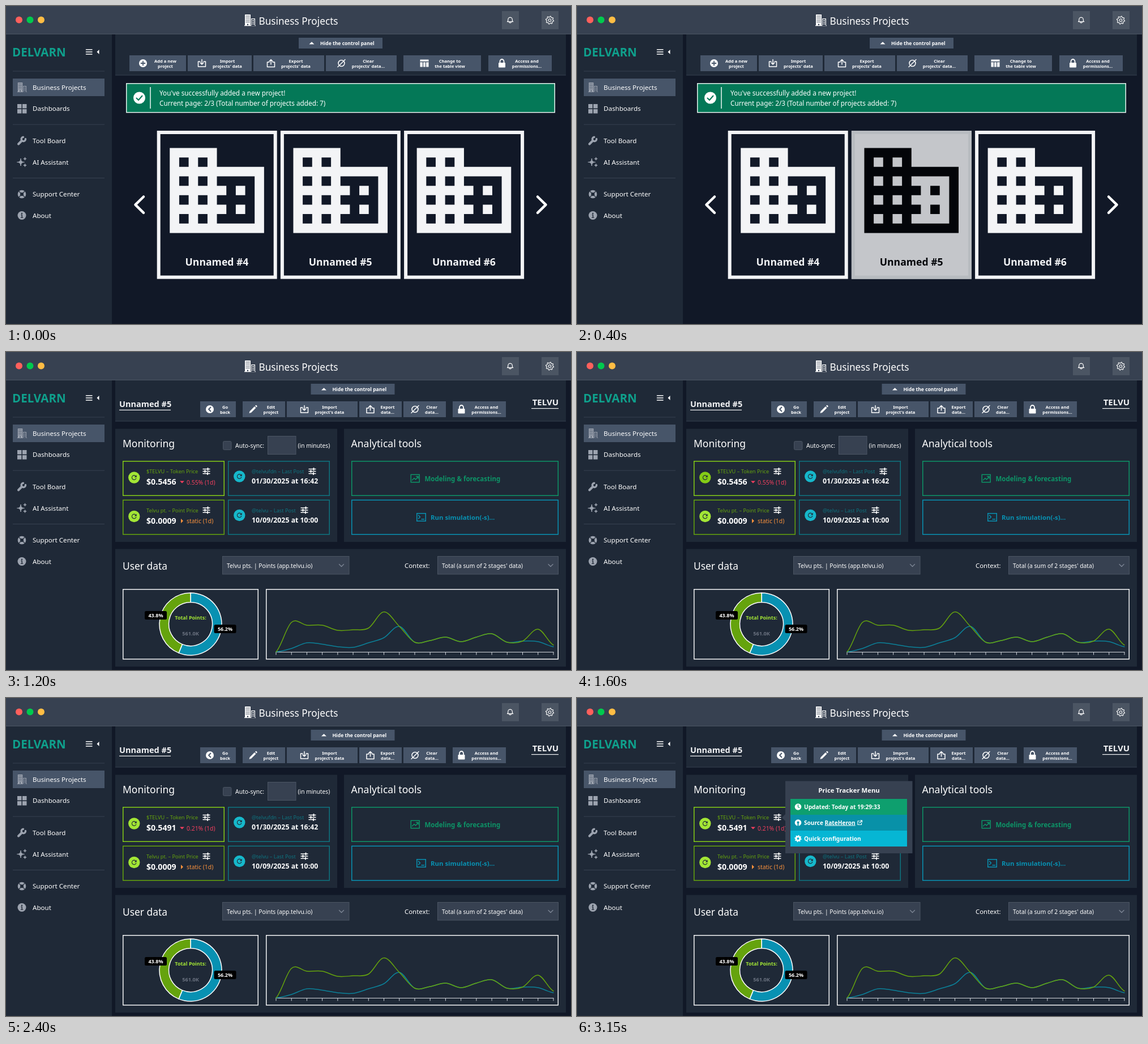
Animation of 998x561 px, one loop 3900 ms. Source, as an HTML page:

```html
<!DOCTYPE html>
<html lang="en">
<head>
<meta charset="utf-8">
<title>Business Projects</title>
<style>
html, body { margin: 0; width: 100%; height: 100%; overflow: hidden; background: #111827; }
svg { display: block; width: 100vw; height: 100vh; }
text { font-family: "Noto Sans", "Open Sans", sans-serif; white-space: pre; }
.line { fill: none; stroke: #fff; stroke-width: 1.5; }
.round { stroke-linecap: round; stroke-linejoin: round; }

/* Every state switches hard on one 3.9 s timeline. */
.list, .hover, .detail, .old, .new, .menu, .tracker, .refresh {
  animation: 3900ms step-end infinite;
}
.list { animation-name: list; }
.hover { animation-name: hover; }
.detail { animation-name: detail; }
.old { animation-name: old; }
.new { animation-name: new; }
.menu { animation-name: menu; }
.tracker { animation-name: tracker; }
.refresh { animation-name: refresh; }
@keyframes list { 0% { opacity: 1 } 20.5128%, 100% { opacity: 0 } }
@keyframes hover { 0% { opacity: 0 } 10.2564% { opacity: 1 } 20.5128%, 100% { opacity: 0 } }
@keyframes detail { 0% { opacity: 0 } 20.5128%, 100% { opacity: 1 } }
@keyframes old { 0% { opacity: 1 } 51.282%, 100% { opacity: 0 } }
@keyframes new { 0% { opacity: 0 } 51.282%, 100% { opacity: 1 } }
@keyframes menu { 0% { opacity: 0 } 80.7692%, 100% { opacity: 1 } }
@keyframes tracker { 0% { stroke: #65a30d } 30.7692%, 100% { stroke: #84cc16 } }
@keyframes refresh { 0% { fill: #a3e635 } 41.0256% { fill: #84cc16 } 61.5384%, 100% { fill: #a3e635 } }
</style>
</head>
<body>
<svg id="stage" viewBox="0 0 998 561" preserveAspectRatio="none">
  <defs>
    <path id="office" fill-rule="evenodd" d="M12 7V3H2v18h20V7zM4 5h2v2H4zm0 4h2v2H4zm0 4h2v2H4zm0 4h2v2H4zM8 5h2v2H8zm0 4h2v2H8zm0 4h2v2H8zm0 4h2v2H8zM12 9h8v10h-8v-2h2v-2h-2v-2h2v-2h-2zm4 2h2v2h-2zm0 4h2v2h-2z"/>
    <path id="reload" transform="scale(.55) translate(-12 -12)" d="M17.65 6.35A8 8 0 1 0 19.73 14h-2.08A6 6 0 1 1 12 6c1.66 0 3.14.69 4.22 1.78L13 11h7V4z"/>
    <g id="sliders" class="line round">
      <path d="M0 1.5h12M0 5.5h12M0 9.5h12" stroke-width="1.3"/>
      <path d="M8.5 0v3M3.5 4v3M8 8v3" stroke-width="2"/>
    </g>
    <g id="towers" fill-rule="evenodd">
      <path d="M1 0h10v20H1zM2.7 2v1.6h1.6V2zM5.2 2v1.6h1.6V2zM7.7 2v1.6h1.6V2zM2.7 5.5v1.6h1.6V5.500zM5.200 5.500v1.600h1.600V5.500zM7.700 5.500v1.600h1.600V5.500zM2.700 9v1.600h1.600V9zM5.200 9v1.600h1.600V9zM7.700 9v1.600h1.600V9zM2.700 12.500v1.600h1.600v-1.600zM5.200 12.500v1.600h1.600v-1.600zM7.700 12.500v1.600h1.600v-1.600zM5 16.500V20h2v-3.500z"/>
      <path d="M12 7h7v13h-7zM13 8.200V19h4.800V8.200zM14 10h3v1.200h-3zM14 13h3v1.200h-3zM14 16h3v1.200h-3zM0 19h20v1.300H0z"/>
    </g>
  </defs>
</svg>
<script>
const slate = '#475569', panel = '#1f2937', gray = '#374151', pale = '#f3f4f6', muted = '#9ca3af';

const rect = (x, y, r, b, fill, extra = '') =>
  `<rect x="${x}" y="${y}" width="${r - x}" height="${b - y}" fill="${fill}" ${extra}/>`;
const frame = (x, y, r, b, fill, color, w = 1.5, extra = '') =>
  rect(x + w / 2, y + w / 2, r - w / 2, b - w / 2, fill, `stroke="${color}" stroke-width="${w}" ${extra}`);
const text = (x, y, size, str, fill = '#fff', weight = 400, anchor = 'start') =>
  `<text x="${x}" y="${y}" font-size="${size}" fill="${fill}" font-weight="${weight}" text-anchor="${anchor}">${str}</text>`;
const circle = (x, y, r, fill, extra = '') => `<circle cx="${x}" cy="${y}" r="${r}" fill="${fill}" ${extra}/>`;
const path = (d, fill, extra = '') => `<path d="${d}" fill="${fill}" ${extra}/>`;
const line = (d, color = '#fff', w = 1.5) =>
  `<path d="${d}" class="line round" style="stroke:${color};stroke-width:${w}"/>`;
const at = (x, y, body, scale = 1) => `<g transform="translate(${x} ${y}) scale(${scale})">${body}</g>`;
const group = (name, body) => `<g class="${name}">${body}</g>`;
const use = (id, fill = '#fff') => `<use href="#${id}" fill="${fill}"/>`;

function gear(r) {
  const points = Array.from({ length: 32 }, (_, i) => {
    const a = (i + .5) * Math.PI / 16, d = i % 4 < 2 ? r : r * .76;
    return `${(d * Math.cos(a)).toFixed(2)} ${(d * Math.sin(a)).toFixed(2)}`;
  });
  return `M${points.join('L')}Z`;
}

const icons = {
  plus: circle(0, 0, 7, '#fff') + line('M-3.500 0h7M0-3.500v7', slate, 1.8),
  import: line('M-3-3h-3.500v9h13v-9H3M0-6.500v8.500M-3-1l3 3 3-3'),
  export: line('M-3-2h-3.500v8.500h13V-2H3M0 2v-8.500M-3-3.500l3-3 3 3'),
  clear: circle(0, 0, 5.5, 'none', 'class="line"') + line('M-6.500 6.500l13-13'),
  table: rect(-7.5, -6.5, 7.5, 6.5, '#fff') + line('M-7-2.500H7M-2.500-2v8.500M2.500-2v8.500', slate, 1.3),
  lock: rect(-6, -1, 6, 7.5, '#fff', 'rx="1"') + line('M-3.500-1v-2.500a3.500 3.500 0 0 1 7 0V-1', '#fff', 1.8),
  back: circle(0, 0, 7, '#fff') + line('M1.500-3.500L-2 0l3.500 3.500', slate, 1.8),
  edit: path('M-7 7l1-3.500L2.500-5 5-2.500-3.500 6zM3.500-6l1-1q1-.500 2 .500t.500 2l-1 1z', '#fff')
};

function button(x, r, icon, iconX, textX, first, second) {
  return rect(x, 87, r, 115, slate) + at(iconX, 101, icons[icon]) +
    text(textX, 100, 7.6, first, '#fff', 600, 'middle') +
    text(textX, 108.6, 7.6, second, '#fff', 600, 'middle');
}

function controlBar(x) {
  return rect(193, 50, 989, 122, panel) + rect(193, 121.5, 989, 122.5, gray) +
    rect(x, 56, x + 148, 75, slate) +
    path(`M${x + 18.500} 67.500h9l-4.500-4.200z`, '#fff') +
    text(x + 38, 69, 8.6, 'Hide the control panel', '#fff', 600);
}

function sidebar() {
  const labels = [['Business Projects', 148], ['Dashboards', 185], ['Tool Board', 242],
    ['AI Assistant', 279.5], ['Support Center', 336], ['About', 374]];
  const star = (x, y, r) =>
    path(`M${x} ${y - r}Q${x} ${y} ${x + r} ${y}Q${x} ${y} ${x} ${y + r}Q${x} ${y} ${x - r} ${y}Q${x} ${y} ${x} ${y - r}`,
      muted, `stroke="${muted}"`);
  const tiles = [[20, 173], [29, 173], [20, 182], [29, 182]];
  return rect(0, 50, 187, 561, panel) +
    text(11, 89, 20.5, 'DELVARN', '#0fa08c', 700) +
    line('M141.500 77h10.500M141.500 81h10.500M141.500 85h10.500', '#fff', 1.5) + path('M164.500 77v8l-4-4z', '#fff') +
    [115, 209, 303.5].map(y => rect(12, y - .5, 174, y + .5, gray)).join('') +
    rect(12, 128, 174, 159, slate) + at(20, 135, use('towers', muted), .84) +
    tiles.map(([x, y]) => rect(x, y, x + 7.5, y + 7.5, muted)).join('') +
    line('M22 243.500l6-6', muted, 4) + line('M34.500 234.500a3.700 3.700 0 1 1-4-3.300', muted, 3.4) +
    star(26, 275.5, 6.5) + star(33.5, 269.5, 2.6) + star(33.5, 281, 2.6) +
    circle(28, 332, 5.2, 'none', `stroke="${muted}" stroke-width="4.200"`) +
    line('M23 327l2.500 2.500M33 327l-2.500 2.500M23 337l2.500-2.500M33 337l-2.500-2.500', panel, 1.2) +
    circle(28, 369.5, 7.5, muted) + circle(28, 366, 1.2, panel) + line('M27 368.500h1.200v4.500M26.500 373.200h3.200', panel, 1.3) +
    labels.map(([s, y]) => text(47, y, 11.6, s)).join('');
}

function header() {
  return rect(0, 0, 998, 50, gray) + rect(0, 49, 998, 50, '#4b5563') +
    circle(23, 24.5, 6, '#ff605c') + circle(42.5, 24.5, 6, '#00ca4e') + circle(62, 24.5, 6, '#ffbd44') +
    at(421, 15, use('towers')) + text(446.5, 33, 17.2, 'Business Projects') +
    rect(876, 9, 906, 41, '#4b5563') + rect(946, 9, 976, 41, '#4b5563') +
    at(883, 17, line('M4 17h16l-2-2.500V11a6 6 0 0 0-12 0v3.500zM9 17.500a3 3 0 0 0 6 0', '#fff', 1.9), .63) +
    at(960.5, 25, line(gear(7), '#fff', 1.1) + circle(0, 0, 2.3, 'none', 'stroke="#fff" stroke-width="1.100"'));
}

function projectCard(x, number, fill, border, ink) {
  return frame(x, 220, x + 212, 481.5, fill, border, 6) + at(x + 5.9, 225.5, use('office', ink), 8.33) +
    text(x + 105.8, 458, 17.6, `Unnamed #${number}`, ink, 700, 'middle');
}

function projectList() {
  const cards = [4, 5, 6].map((n, i) => projectCard(266.7 + i * 218.2, n, '#111827', pale, pale)).join('');
  return controlBar(517) +
    button(218, 318, 'plus', 242, 281.5, 'Add a new', 'project') +
    button(321, 434, 'import', 346, 391, 'Import', "projects' data") +
    button(437, 562, 'export', 468, 512, 'Export', "projects' data") +
    button(565, 690, 'clear', 592.5, 640, 'Clear', "projects' data...") +
    button(702, 839, 'table', 739, 784, 'Change to', 'the table view') +
    button(852, 964, 'lock', 876, 920, 'Access and', 'permissions...') +
    frame(212, 136, 970, 188.5, '#047857', '#e5f3ee') +
    circle(235.5, 162, 10.5, '#fff') + line('M230.500 162.500l3.500 3.500 6.500-7.500', '#047857', 2) +
    rect(254.3, 143, 255.7, 181, '#fff') +
    text(271, 157.5, 11.75, "You've successfully added a new project!") +
    text(271, 176, 11.75, 'Current page: 2/3 (Total number of projects added: 7)') +
    line('M243 336.500l-14.500 14.200 14.500 14.200', '#fff', 4.5) + line('M939 336.500l14.500 14.200-14.500 14.200', '#fff', 4.5) +
    cards + group('hover', projectCard(484.9, 5, '#c4c6ca', '#b8bcc0', '#030509'));
}

function feed(x, y, label, slidersX, color, iconColor, iconY, classes = ['', '']) {
  const border = `class="${classes[0]}"`, disc = `class="${classes[1]}"`;
  return frame(x, y, x + 180, y + 62, panel, color, 1.5, border) +
    circle(x + 20.3, iconY, 10.2, iconColor, disc) + at(x + 20.3, iconY, use('reload', panel)) +
    text(x + 42, y + 22, 9.2, label, color) + at(slidersX, y + 13, use('sliders'));
}

const price = (value, change) =>
  text(248, 234, 14.2, value, '#fff', 700) + text(319, 233.5, 10.4, change, '#f43f5e');

function monitoring() {
  const lime = '#65a30d', teal = '#0e7480', cyan = '#16b8cb';
  return rect(193, 135.5, 585, 335, panel) + text(206, 168, 17.5, 'Monitoring') +
    frame(383, 157, 398.5, 173, gray, '#4b5563', 1, 'rx="2"') + text(405, 169, 10.4, 'Auto-sync:') +
    frame(462, 148, 512.5, 181, gray, '#4b5563', 1) + text(515.5, 168.5, 10.2, '(in minutes)') +
    feed(206, 192, '$TELVU – Token Price', 348, lime, '#a3e635', 221.5, ['tracker', 'refresh']) +
    feed(206, 260.5, 'Telvu pt. – Point Price', 348, lime, '#a3e635', 290) +
    feed(392, 192, '@telvufdn – Last Post', 535, teal, cyan, 219.5) +
    feed(392, 260.5, '@telvu – Last Post', 521, teal, cyan, 288) +
    group('old', price('$0.5456', '0.55% (1d)')) + group('new', price('$0.5491', '0.21% (1d)')) +
    path('M307 227.500h8l-4 4z', '#f43f5e') +
    text(248, 303, 14.2, '$0.0009', '#fff', 700) + path('M309 294v8l4-4z', '#fb923c') +
    text(319, 302, 10.4, 'static (1d)', '#fb923c') +
    text(434, 232, 12.3, '01/30/2025 at 16:42', '#fff', 700) +
    text(434, 301, 12.3, '10/09/2025 at 10:00', '#fff', 700);
}

function tools() {
  const green = '#0d9467', blue = '#0891b2';
  return rect(597, 135.5, 989, 335, panel) + text(609.5, 168, 17.6, 'Analytical tools') +
    frame(610, 192, 976, 254, panel, green) + frame(610, 260.5, 976, 322.5, panel, blue) +
    frame(714.5, 215.5, 731, 230.5, 'none', green) + line('M717.500 226l3.500-3.500 2.500 2.500 4.500-5M724.500 219.500h3.700v3.500', green, 1.5) +
    text(739.5, 227.5, 11.5, 'Modeling &amp; forecasting', green, 600) +
    frame(725, 284, 742, 299, 'none', blue) + line('M728.500 288l3 3-3 3M734 295h4.500', blue, 1.5) +
    text(750, 296, 11.4, 'Run simulation(-s)...', blue, 600);
}

const select = (x, r, label) => frame(x, 360, r, 392.5, gray, '#4b5563', 1) +
  text(x + 8, 380.5, 10.25, label) + line(`M${r - 18} 374.500l4 4 4-4`, '#7b8493', 1.4);

const tag = (x, y, label) => rect(x, y, x + 39, y + 15, '#000', 'rx="2.500"') +
  text(x + 19.5, y + 10.8, 9, label, '#fff', 700, 'middle');

function donut() {
  const x = 326, y = 480, outer = 55, inner = 38.5;
  const point = (r, part) => {
    const a = part * 2 * Math.PI;
    return `${x + r * Math.sin(a)} ${y - r * Math.cos(a)}`;
  };
  const slice = (from, to, color) => {
    const large = to - from > .5 ? 1 : 0;
    return path(`M${point(outer, from)}A${outer} ${outer} 0 ${large} 1 ${point(outer, to)}L${point(inner, to)}` +
      `A${inner} ${inner} 0 ${large} 0 ${point(inner, from)}Z`, color, 'stroke="#fff" stroke-width="1.500"');
  };
  return slice(0, .562, '#0891b2') + slice(.562, 1, '#65a30d') +
    text(x, 472, 9, 'Total Points:', '#a3e635', 700, 'middle') +
    text(x, 500, 9.2, '561.0K', '#6b7280', 700, 'middle') +
    tag(245, 457, '43.8%') + tag(367.5, 481, '56.2%');
}

function lineChart() {
  const left = 477, step = 27.22;
  const total = [529, 477, 482, 482, 491, 490, 487, 458.5, 484, 512, 509, 503, 511, 503, 497, 512, 510, 489, 517];
  const stage = [529, 523, 513, 515.5, 520, 521, 513, 504, ...total.slice(8, 17), 511, 520];
  const curve = (ys, color) => {
    const slope = i => ((ys[i + 1] ?? ys[i]) - (ys[i - 1] ?? ys[i])) / 6;
    const d = ys.slice(1).map((y, i) => {
      const x = left + i * step;
      return `C${x + step / 3} ${ys[i] + slope(i)} ${x + step * 2 / 3} ${y - slope(i + 1)} ${x + step} ${y}`;
    });
    return line(`M${left} ${ys[0]}${d.join('')}`, color, 1.5);
  };
  const ticks = total.map((_, i) => `M${left + i * step} 529.500v4.500`).join('');
  return line(`M${left} 529.500h${18 * step}${ticks}`, '#d1d5db', 1) +
    curve(stage, '#0b8199') + curve(total, '#65a30d');
}

function userData() {
  return rect(193, 347.5, 989, 555, panel) + text(206, 384, 17.4, 'User data') +
    select(382, 606.5, 'Telvu pts. | Points (app.telvu.io)') +
    text(704, 381, 11.4, 'Context:') + select(762, 976, "Total (a sum of 2 stages' data)") +
    frame(206, 418, 446, 542.5, panel, pale) + frame(459, 418, 976, 542.5, panel, pale) +
    donut() + lineChart();
}

function trackerMenu() {
  return path('M368 205v12l-6-6z', gray) + rect(368, 146.5, 592.5, 274, gray) +
    text(480.5, 166.5, 11.3, 'Price Tracker Menu', '#fff', 600, 'middle') +
    rect(377, 178, 583, 206, '#0e9f6e') + rect(377, 206, 583, 234, '#0891a8') + rect(377, 234, 583, 262, '#06b6d4') +
    circle(390.5, 192, 5.8, '#fff') + line('M390.500 188.500v3.700l2.300 1.300', '#0e9f6e', 1.3) +
    circle(390.5, 220, 5.8, '#fff') + line('M390.500 221v5', '#0891a8', 2) + circle(390.5, 219.5, 2, '#0891a8') +
    at(390.5, 248, path(gear(6.3), '#fff') + circle(0, 0, 2, '#06b6d4')) +
    text(401, 195.5, 10.1, 'Updated: Today at 19:29:33', '#fff', 600) +
    text(401, 223.5, 10.1, 'Source <tspan text-decoration="underline">RateHeron</tspan>', '#fff', 600) +
    line('M499 217h-3v6.500h6.500v-3M500.500 216h3v3M503.500 216l-4.500 4.500', '#fff', 1.1) +
    text(401, 251.8, 10.1, 'Quick configuration', '#fff', 600);
}

function projectDetail() {
  return rect(187, 50, 998, 561, '#111827') + controlBar(538.5) +
    text(200, 97, 14.5, 'Unnamed #5', pale, 600) + rect(200, 101.8, 291, 103, pale) +
    text(976, 94, 15, 'TELVU', pale, 600, 'end') + rect(928, 99, 976, 100.2, pale) +
    button(343, 406, 'back', 360, 387, 'Go', 'back') +
    button(418, 493, 'edit', 436.5, 468, 'Edit', 'project') +
    button(496, 621, 'import', 527, 571.5, 'Import', "project's data") +
    button(624, 699, 'export', 643.5, 674, 'Export', 'data...') +
    button(702, 777, 'clear', 722.5, 752, 'Clear', 'data...') +
    button(789, 883, 'lock', 804.5, 848.5, 'Access and', 'permissions...') +
    monitoring() + tools() + userData() + group('menu', trackerMenu());
}

document.getElementById('stage').insertAdjacentHTML('beforeend',
  rect(0, 0, 998, 561, '#111827') + header() + sidebar() +
  group('list', projectList()) + group('detail', projectDetail()));
</script>
</body>
</html>
```
